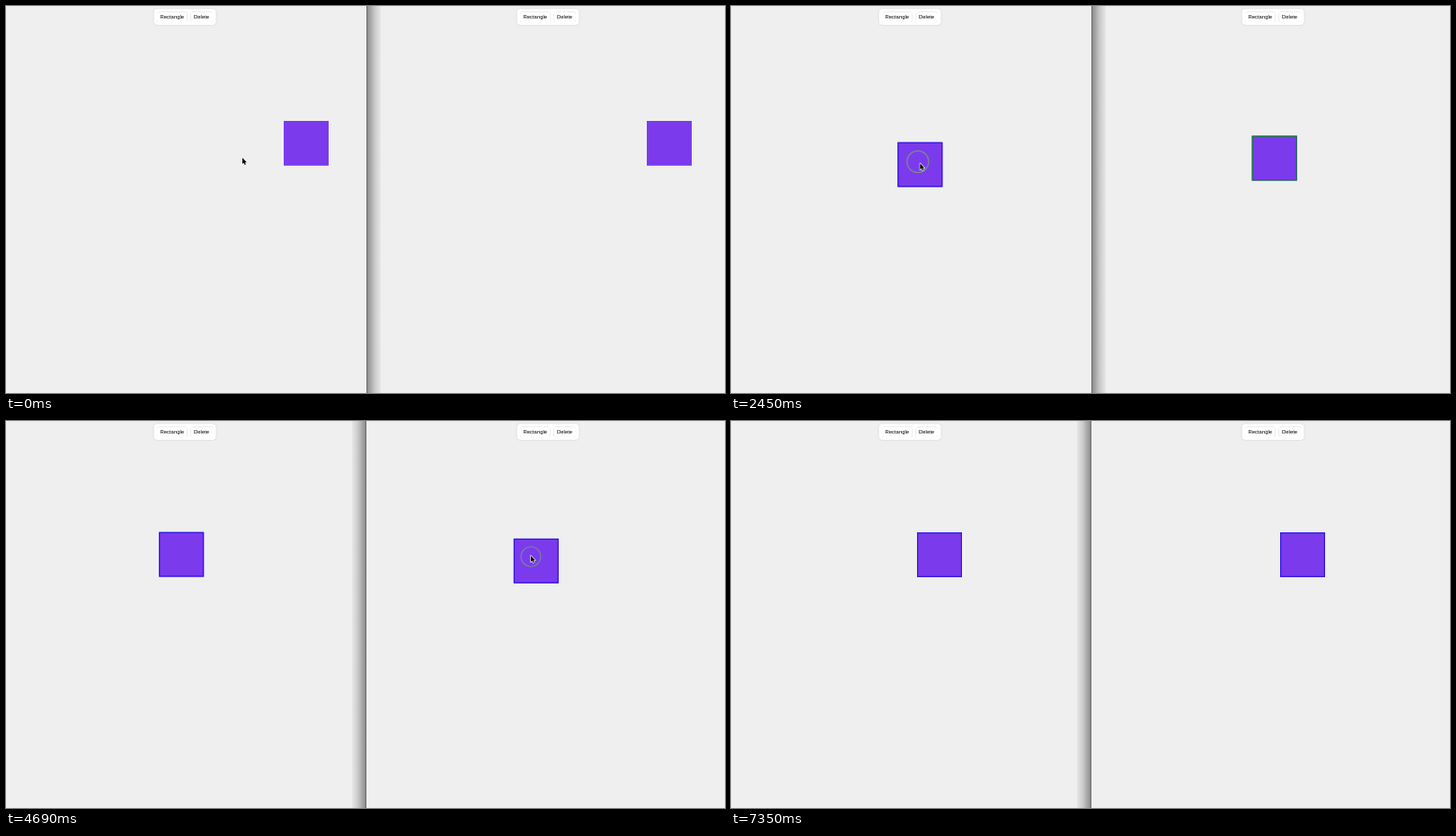
Write an HTML page that moves like this. It is 800 px wide and 431 px high and loops after 7490 ms.

```html
<!DOCTYPE html>
<html lang="en">
<head>
<meta charset="utf-8">
<title>Shared canvas</title>
<style>
  html, body { margin: 0; width: 100%; height: 100%; overflow: hidden; background: #efefef; }
  svg { display: block; width: 100vw; height: 100vh; }
  text { font: 5.9px "Liberation Sans", Arial, sans-serif; fill: #000; }
  .bar { fill: #fff; filter: drop-shadow(0 .5px 1px rgba(0, 0, 0, .13)); }
  .btn { fill: #fff; filter: drop-shadow(0 .3px .6px rgba(0, 0, 0, .28)); }
  .box { fill: #7c3aed; }
  .edge { fill: none; }
  .blue .edge { stroke: #2d14e6; stroke-width: 1.2; }
  .green .edge { stroke: #26705a; stroke-width: 1.6; }
</style>
</head>
<body>
<svg viewBox="0 0 800 431">
  <defs>
    <linearGradient id="shade">
      <stop offset="0" stop-color="#878787"/>
      <stop offset=".6" stop-color="#cbcbcb"/>
      <stop offset="1" stop-color="#e7e7e7"/>
    </linearGradient>
    <g id="tools">
      <rect class="bar" x="164.7" y="3.3" width="68.8" height="17.6" rx="3.8"/>
      <rect class="btn" x="168" y="6.6" width="33.6" height="11.4" rx="2.6"/>
      <rect class="btn" x="205.6" y="6.6" width="24.4" height="11.4" rx="2.6"/>
      <text x="171.5" y="14.3">Rectangle</text>
      <text x="209.1" y="14.3">Delete</text>
    </g>
    <g id="square">
      <rect class="box" width="50" height="49.8"/>
      <rect class="edge" x=".6" y=".6" width="48.8" height="48.6"/>
    </g>
  </defs>
  <rect width="800" height="431" fill="#efefef"/>
  <g id="divider">
    <rect x="401" width="16" height="431" fill="url(#shade)"/>
    <rect x="401" width="1" height="431" fill="#6c6c6c"/>
  </g>
  <use href="#tools"/>
  <use href="#tools" x="404"/>
  <g id="left"><rect class="box" width="50" height="49.8"/><rect class="edge" x=".6" y=".6" width="48.8" height="48.6"/></g>
  <g id="right"><rect class="box" width="50" height="49.8"/><rect class="edge" x=".6" y=".6" width="48.8" height="48.6"/></g>
  <circle id="ring" fill="none" stroke="#75927f" stroke-width="1.2"/>
  <path id="mouse" d="M0 0V7.1L1.6 5.6L2.7 8.1L3.9 7.6L2.8 5.2H5Z" stroke="#fff" stroke-width="1.2" paint-order="stroke" stroke-linejoin="round"/>
</svg>
<script>
const LOOP = 7490, STEP = 70, GAP = 404, GRAB = 20;
const NEAR = 40, FAR = 120; // delay of the dragged box and of its mirror
const PRESS = [[1470, 3290], [4410, 5850]];
const QUIT = 7070;

// pointer gestures as key points (time, x, y); it rests in between
const gestures = [
  [[280, 263, 169], [770, 300, 166]],
  [[910, 300, 166], [1400, 329, 148]],
  [[1760, 329, 148], [1960, 277, 149], [2140, 190, 150], [2600, 222, 186],
   [2870, 199, 190], [2940, 185, 166], [3000, 182, 135], [3200, 191, 143]],
  [[3360, 191, 143], [3710, 300, 158]],
  [[3850, 300, 158], [4340, 595, 143]],
  [[4550, 595, 143], [4670, 584, 151], [4900, 594, 130], [5160, 658, 144],
   [5320, 604, 131], [5430, 586, 154], [5600, 622, 164], [5830, 631, 144]],
  [[6020, 631, 144], [QUIT, 560, -12]]
];

const clamp = (v, a, b) => Math.min(b, Math.max(a, v));

// smooth curve through a gesture, starting and ending at rest
function curve(pts, t) {
  const last = pts.length - 1;
  t = clamp(t, pts[0][0], pts[last][0]);
  const i = Math.max(0, pts.findIndex(p => p[0] >= t) - 1);
  const p = pts[i], q = pts[i + 1], h = q[0] - p[0];
  const u = (t - p[0]) / h, ease = u * u * (3 - 2 * u);
  const speed = (j, k) => j === 0 || j === last ? 0
    : (pts[j + 1][k] - pts[j - 1][k]) / (pts[j + 1][0] - pts[j - 1][0]);
  return [1, 2].map(k => p[k] + (q[k] - p[k]) * ease +
    h * u * (1 - u) * ((1 - u) * speed(i, k) - u * speed(i + 1, k)));
}

const tip = t => curve(gestures.findLast(g => g[0][0] <= t) || gestures[0], t);

function boxAt(t) {
  const n = t < PRESS[1][0] ? 0 : 1;
  const [x, y] = tip(clamp(t, ...PRESS[n]));
  return [x - GRAB - n * GAP, y - GRAB];
}

const el = id => document.getElementById(id);
const move = (id, x, y) => el(id).setAttribute('transform', `translate(${x.toFixed(2)} ${y.toFixed(2)})`);

function drawBox(id, dx, t, color) {
  const [x, y] = boxAt(t);
  move(id, x + dx, y);
  el(id).setAttribute('class', color);
}

function drawRing(t) {
  const [down, up] = PRESS.findLast(p => t >= p[0]) || PRESS[0];
  const grow = clamp((t - down) / 350, 0, 1);
  const fade = clamp((t - up) / 210, 0, 1);
  move('ring', ...tip(t - NEAR / 2));
  el('ring').setAttribute('r', 7 + 5 * grow + 6 * fade);
  el('ring').setAttribute('opacity', grow * (1 - fade));
}

function draw(t) {
  const picked = t >= PRESS[0][0], swapped = t >= PRESS[1][0];
  drawBox('left', 0, t - (swapped ? FAR : NEAR), picked ? 'blue' : '');
  drawBox('right', GAP, t - (swapped ? NEAR : FAR), swapped ? 'blue' : picked ? 'green' : '');
  el('divider').setAttribute('transform', swapped ? 'translate(802 0) scale(-1 1)' : '');
  drawRing(t);
  move('mouse', ...tip(t));
  el('mouse').setAttribute('opacity', t < QUIT ? 1 : 0);
}

const start = performance.now();
function tick() {
  const t = (performance.now() - start) % LOOP;
  draw(Math.floor(t / STEP) * STEP);
  requestAnimationFrame(tick);
}
tick();
</script>
</body>
</html>
```
